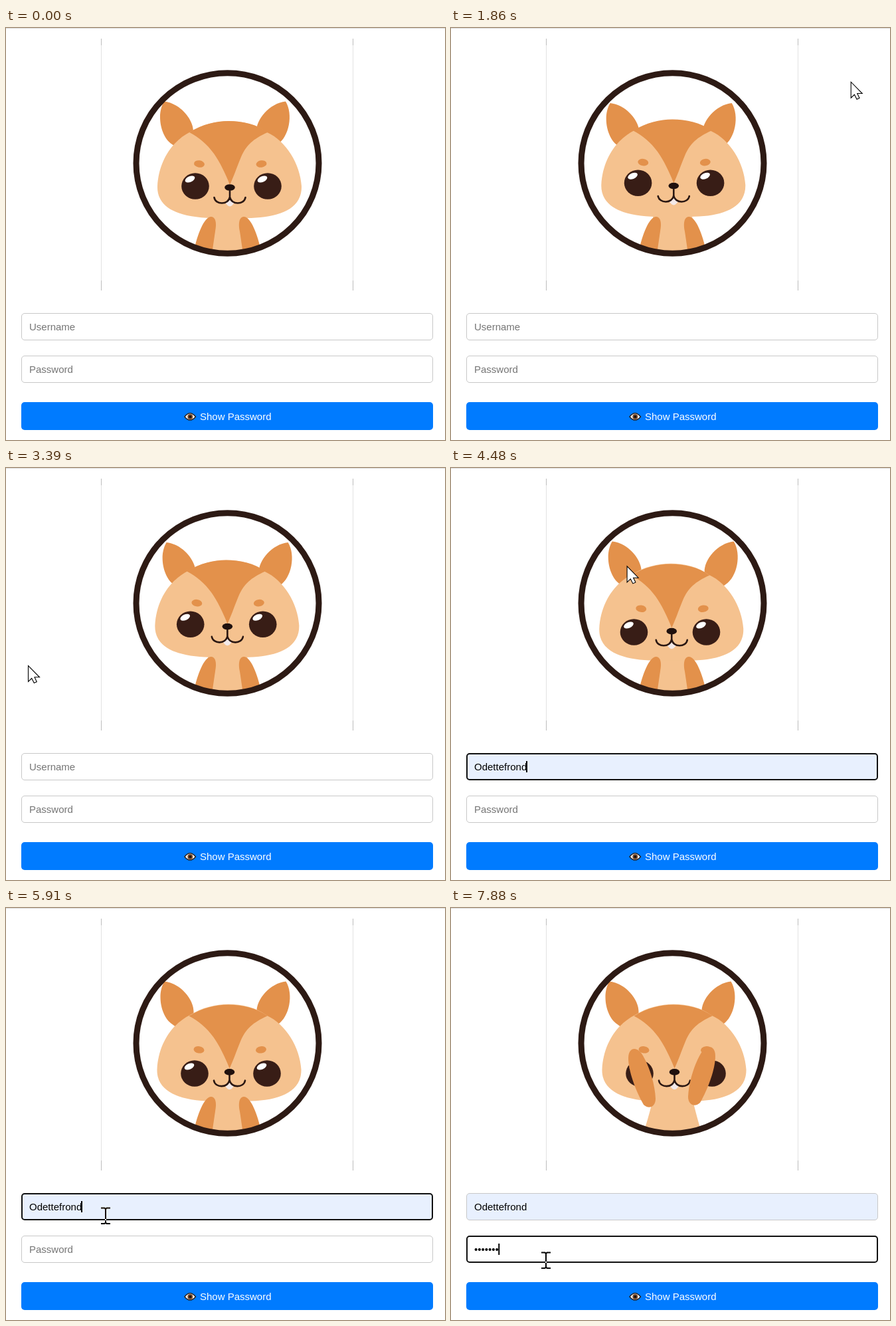
Recreate the animation shown at these times as an HTML page. Size 661 px wide and 620 px high, loop 8 s.

```html
<!DOCTYPE html>
<html lang="en">
<head>
<meta charset="utf-8">
<title>Login avatar</title>
<style>
  html, body { margin: 0; width: 100%; height: 100%; overflow: hidden; background: #fff; }
  svg { display: block; width: 661px; height: 620px; }
  text { font: 15px "Liberation Sans", Arial, sans-serif; white-space: pre; }
  .fur { fill: #f5c28f; }
  .rust { fill: #e3914b; }
  .dark { fill: #381d16; }
  .hint { fill: #757575; }
  .line { fill: none; stroke: #2a1712; stroke-width: 2.6; stroke-linecap: round; }
  #beam { mix-blend-mode: difference; fill: none; stroke: #fff; stroke-width: 2; }
</style>
</head>
<body>
<svg viewBox="0 0 661 620">
  <defs>
    <clipPath id="disc"><ellipse cx="333.5" cy="203.5" rx="138" ry="136"/></clipPath>
    <path id="ear" d="M238 110.500C262 113 283 138 282 157L284 172L262 184L250 175C233 164 226 130 238 110.500Z"/>
    <ellipse id="brow" rx="8" ry="5.200" transform="rotate(8)"/>
    <g id="eye">
      <ellipse class="dark" rx="20.800" ry="19.800"/>
      <ellipse cx="-8" cy="-10.500" rx="7.800" ry="4.300" transform="rotate(-24 -8 -10.500)" fill="#fff"/>
    </g>
    <path id="arm" d="M283 335C288 312 298 284 309 284C317 285 317 296 315 306L310 340Z"/>
    <path id="hand" d="M267 226C267 210 279 208 287 219C298 236 307 264 308 287C308 300 297 303 290 296C280 279 267 247 267 226Z"/>
  </defs>
  <rect width="661" height="620" fill="#fff"/>
  <path d="M0 .5H661" stroke="#ddd"/>
  <path d="M143.500 16V395M522.500 16V395" stroke="#e2e2e2"/>
  <path d="M143.500 16V395M522.500 16V395" stroke="#bdbdbd" stroke-dasharray="10 354 15"/>

  <g clip-path="url(#disc)">
    <path class="fur" d="M305 278C303 296 298 312 288 345H379C371 316 366 300 362 278Z"/>
    <g id="ears" class="rust">
      <use href="#ear"/>
      <use href="#ear" transform="translate(659) scale(-1 1)"/>
    </g>
    <path id="face" class="fur" d="M228 238C230 200 250 170 278 156C296 145 316 140 336 140C356 140 377 145 393 157C422 170 443 205 445 238C446 274 408 286 362 286H310C264 285 227 273 228 238Z"/>
    <path id="patch" class="rust" d="M276 157C296 145 316 140 335 140C356 140 378 145 394 157C372 167 362 176 354 194C347 211 342 226 337 236C330 218 322 202 313 189C302 174 291 165 276 157Z"/>
    <g id="brows" class="rust">
      <use href="#brow" x="291" y="204.500"/>
      <use href="#brow" transform="translate(384.500 204.500) scale(-1 1)"/>
    </g>
    <g id="eyes">
      <use href="#eye" x="285" y="238"/>
      <use href="#eye" x="394" y="238"/>
    </g>
    <g id="mouth">
      <path d="M330 262Q337 275 344 262L337 257Z" fill="#f3e9e8"/>
      <path class="line" d="M313.500 255C315 266 335 267 337 254C339 267 359 266 360.500 255M337 245V255"/>
    </g>
    <ellipse id="nose" cx="337" cy="240" rx="7.800" ry="4.800" fill="#20110e"/>
    <g id="arms" class="rust">
      <use href="#arm"/>
      <use href="#arm" transform="translate(667) scale(-1 1)"/>
    </g>
    <g id="hands" class="rust">
      <use href="#hand"/>
      <use href="#hand" transform="translate(665 -3) scale(-1 1)"/>
    </g>
  </g>
  <ellipse cx="333.500" cy="203.500" rx="137.500" ry="135.800" fill="none" stroke="#2d1a14" stroke-width="9"/>

  <rect id="userBox"/>
  <rect id="passBox"/>
  <text id="user" x="35" y="455"></text>
  <text id="pass" x="35" y="519"></text>
  <rect id="caret" width="2" height="17"/>

  <rect x="23" y="563" width="620" height="42" rx="5" fill="#007bff"/>
  <path d="M269 585Q277 574.500 285.500 585Q277 595 269 585Z" fill="#fff" stroke="#2b2320" stroke-width="1.500"/>
  <circle cx="277.300" cy="585" r="4" fill="#7a4a2c"/>
  <circle cx="277.300" cy="585" r="2" fill="#111"/>
  <text x="292" y="590" fill="#fff">Show Password</text>

  <path id="arrow" d="M.5.5V24.500L5.700 19.500L9.300 26.500L13.300 24.700L10 17.800H17.500Z" fill="#fff" stroke="#000" stroke-width="1.100"/>
  <path id="beam" d="M-7-11.500H-1.500L0-10L1.500-11.500H7M0-10.500V10.500M-7 12H-1.500L0 10.500L1.500 12H7"/>
</svg>
<script>
const LOOP = 8000, LAG = 180;
const ENTER = 190, USER_FOCUS = 4200, PASS_FOCUS = 6940;
const FIRST_KEY = 7220, SECOND_KEY = 7280, KEY_GAP = 100, PASS_LENGTH = 7;
const BLINK_START = 4390, BLINK = 530;
const USER = "Odettefrond";

// The pointer rests between these glides: start, end, x, y
const HOME = [590, 469];
const GLIDES = [
  [190, 960, 105, 162],
  [1100, 1640, 602, 80],
  [1860, 2210, 512, 335],
  [2210, 2430, 564, 301],
  [2430, 2640, 561, 243],
  [3050, 3390, 33, 297],
  [3860, 4150, 80, 442],
  [4150, 4480, 264, 147],
  [4480, 4960, 549, 335],
  [4960, 5450, 215, 453],
  [5850, 5910, 151, 463],
  [5910, 6120, 38, 467],
  [6120, 6540, 143, 530]
];

const $ = id => document.getElementById(id);
const clamp = v => Math.min(1, Math.max(0, v));
const mix = (a, b, k) => a + (b - a) * k;
const ramp = (t, from, to) => clamp((t - from) / (to - from));
const ease = (t, from, to) => {
  const k = ramp(t, from, to);
  return k * k * (3 - 2 * k);
};
const set = (id, attrs) => {
  for (const name in attrs) $(id).setAttribute(name, attrs[name]);
};
const move = (id, x, y) => set(id, { transform: `translate(${x.toFixed(2)} ${y.toFixed(2)})` });
const show = (id, on) => set(id, { visibility: on ? "visible" : "hidden" });

function pointer(t) {
  let [x, y] = HOME;
  for (const [from, to, toX, toY] of GLIDES) {
    const k = ramp(t, from, to);
    x = mix(x, toX, k);
    y = mix(y, toY, k);
  }
  return [x, y];
}

// The head trails the pointer, then turns to the form once a field is focused
function gaze(t) {
  const samples = 8, wake = ease(t, ENTER, ENTER + LAG);
  let x = 0, y = 0;
  for (let i = 0; i < samples; i++) {
    const [px, py] = pointer(t - LAG * i / samples);
    x += wake * (px - 1000) * 0.0043 / samples;
    y += wake * (py - 560) * 0.005 / samples;
  }
  const down = ease(t, 4160, 4420), settle = ease(t, 4600, 4900);
  return [
    mix(mix(x, -4.75, down), -0.5, settle),
    mix(mix(y, 4.5, down), 5.5, settle)
  ];
}

function drawHead(t) {
  const [x, y] = gaze(t);
  const nod = Math.max(0, y);
  move("ears", -x, Math.max(0, -y));
  move("face", x, y * 0.85);
  move("mouth", x, y * 0.85);
  move("patch", x, y);
  move("brows", x, y + nod * 0.6);
  move("eyes", 2 * x, 2 * y);
  move("nose", x, y + nod * 0.25);
  const covered = t >= PASS_FOCUS;
  show("arms", !covered);
  show("hands", covered);
  move("hands", 0, 60 * (1 - ease(t, PASS_FOCUS - 40, PASS_FOCUS + 140)));
}

function drawField(id, y, focused, fill) {
  const inset = focused ? 1 : 0.5;
  set(id, {
    x: 23 + inset, y: y + inset, width: 620 - 2 * inset, height: 41 - 2 * inset,
    rx: 5 - inset, fill, stroke: focused ? "#101010" : "#c8c8c8", "stroke-width": 2 * inset
  });
}

function drawText(id, value, hint) {
  $(id).textContent = value || hint;
  set(id, { class: value ? "" : "hint" });
}

function typedKeys(t) {
  if (t < SECOND_KEY) return t < FIRST_KEY ? 0 : 1;
  const more = Math.floor((t - SECOND_KEY) / KEY_GAP) - 1;
  return Math.min(PASS_LENGTH, 2 + Math.max(0, more));
}

function drawForm(t) {
  const filled = t >= USER_FOCUS, inPass = t >= PASS_FOCUS;
  const typed = typedKeys(t);
  drawField("userBox", 429, filled && !inPass, filled ? "#e8f0fe" : "#fff");
  drawField("passBox", 493, inPass, "#fff");
  drawText("user", filled ? USER : "", "Username");
  drawText("pass", "•".repeat(typed), "Password");
  const lit = inPass || Math.floor((t - BLINK_START) / BLINK) % 2 !== 1;
  show("caret", filled && lit);
  set("caret", inPass ? { x: 34.5 + typed * 5.25, y: 505 } : { x: 113, y: 441 });
}

function drawPointer(t) {
  const [x, y] = pointer(t);
  const inField = x > 23 && x < 643 && (y > 429 && y < 470 || y > 493 && y < 534);
  show("arrow", t >= ENTER && !inField);
  show("beam", t >= ENTER && inField);
  move("arrow", x, y);
  move("beam", Math.round(x), Math.round(y));
}

function render(t) {
  drawHead(t);
  drawForm(t);
  drawPointer(t);
}

const start = performance.now();
function tick() {
  render((performance.now() - start) % LOOP);
  requestAnimationFrame(tick);
}
tick();
</script>
</body>
</html>
```
